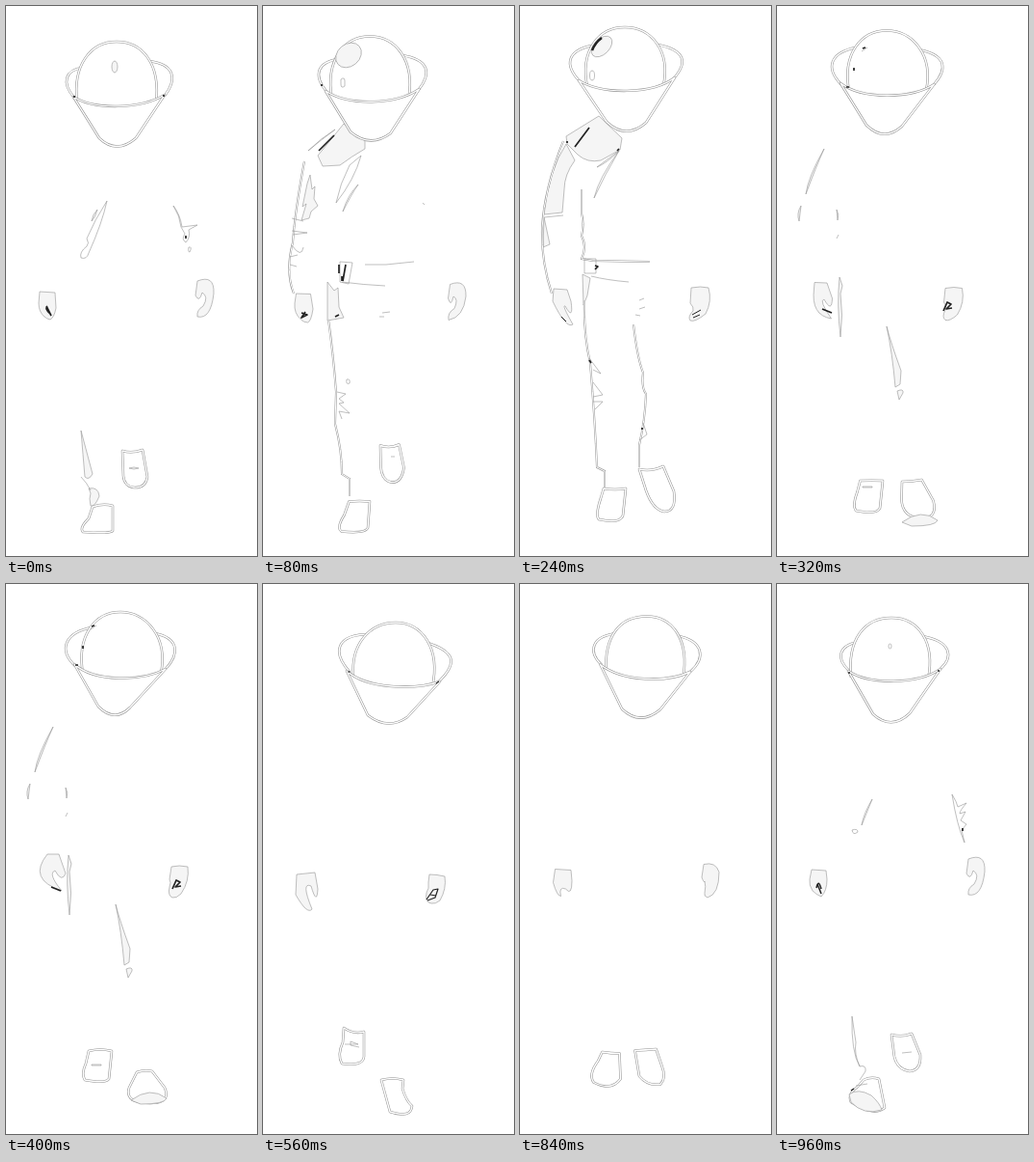
Animation of 261 by 570 pixels, one loop 1 s. Source, as an HTML page without scripts:

```html
<!DOCTYPE html>
<html lang="en">
<head>
<meta charset="utf-8">
<title>Walking suit</title>
<style>
html, body { margin: 0; height: 100%; overflow: hidden; background: #fff }
svg { display: block; width: 100vw; height: 100vh }
path, ellipse { fill: none; stroke: #949494; stroke-width: .6; stroke-linejoin: round }
.out { fill: #fff; stroke: #949494; stroke-width: 2.5 }
.in { stroke: #fff; stroke-width: 1.4 }
.soft { fill: #f5f5f5 }
.ink { stroke: #222; stroke-width: 1.7 }
.seam { stroke: inherit; stroke-width: inherit }
.edge { stroke: #949494; stroke-width: 2 }
.core { stroke: #fff; stroke-width: 1 }

/* every pose holds for 40 ms */
.ears, .dome, .bowl, .handL, .handR, .footL, .footR { animation: 1s steps(4) infinite }
.ears { animation-name: ears }
.dome { animation-name: dome }
.bowl { animation-name: bowl }
.handL { animation-name: handL }
.handR { animation-name: handR }
.footL { animation-name: footL }
.footR { animation-name: footR }

@keyframes ears {
  0%, 100% { d: path("M80 64C62 66 57 79 71 95M148 57C176 60 178 76 165 93") }
  16% { d: path("M76 46C52 51 46 63 61 82M140 45C171 51 172 64 159 80"); animation-timing-function: steps(2) }
  24% { d: path("M75 41C50 46 45 60 62 78M143 40C173 46 174 59 160 75") }
  40% { d: path("M90 45C61 50 54 68 72 85M154 51C181 56 180 73 166 88") }
  56% { d: path("M112 52C75 52 72 71 90 91M168 60C202 70 202 83 182 102") }
  72% { d: path("M121 42C83 43 80 63 95 78M176 53C201 59 203 78 184 94"); animation-timing-function: steps(6) }
  96% { d: path("M84 60C64 64 61 77 75 90M150 54C181 59 184 75 170 88"); animation-timing-function: steps(1) }
}
@keyframes dome {
  0%, 100% { d: path("M74 100C69 61 88 37 115 37S161 60 156 101") }
  16% { d: path("M69 90C61 52 80 26 107 26S155 52 147 90"); animation-timing-function: steps(2) }
  24% { d: path("M70 84C62 46 82 22 109 22S157 46 149 83") }
  40% { d: path("M80 93C73 53 93 29 119 29S169 54 161 93") }
  56% { d: path("M94 96C91 62 111 40 138 40S185 66 176 107") }
  72% { d: path("M102 85C102 50 117 32 144 32S188 56 182 97"); animation-timing-function: steps(6) }
  96% { d: path("M77 97C73 57 91 35 119 35S165 60 157 99"); animation-timing-function: steps(1) }
}
@keyframes bowl {
  0%, 100% { d: path("M70 94C92 108 140 107 165 92L135 137Q115 154 97 137Z") }
  16% { d: path("M60 82C85 99 135 99 160 80L130 127Q108 141 85 124Z"); animation-timing-function: steps(2) }
  24% { d: path("M61 77C85 92 138 92 161 74L131 121Q110 139 90 120Z") }
  40% { d: path("M71 83C92 102 142 101 166 88L129 128Q113 144 96 127Z") }
  56% { d: path("M87 90C108 109 158 110 184 101L150 138Q130 152 109 136Z") }
  72% { d: path("M93 77C118 98 158 101 184 94L154 126Q131 143 112 124Z"); animation-timing-function: steps(6) }
  96% { d: path("M74 90C96 105 147 104 170 88L138 134Q119 152 100 135Z"); animation-timing-function: steps(1) }
}
@keyframes handL {
  0%, 100% { d: path("M35 296L51 297L52 313Q50 323 46 325Q42 324 40 322Q34 317 34 308Z") }
  16% { d: path("M34 300L48 300L52 315Q50 331 47 331Q43 332 39 328Q30 320 32 308Z"); animation-timing-function: steps(2) }
  24% { d: path("M35 293L49 294L53 306Q56 327 47 311Q43 309 55 330Q48 335 34 306Z") }
  40% { d: path("M43 280L55 280L62 300Q58 310 51 297Q43 300 58 318Q22 306 43 280Z") }
  56% { d: path("M35 301L54 299L57 316Q56 334 50 313Q39 308 51 337Q46 343 34 322Z") }
  72% { d: path("M37 295L55 296L56 309Q56 330 49 308Q39 304 48 329Q44 335 35 313Z"); animation-timing-function: steps(6) }
  96% { d: path("M36 296L51 297L52 306Q52 318 46 324Q41 322 37 318Q33 312 34 306Z"); animation-timing-function: steps(1) }
}
@keyframes handR {
  0%, 96%, 100% { d: path("M199 285Q217 278 216 298Q213 325 199 322Q198 315 205 311Q211 301 204 297Q201 308 197 300Z") }
  16% { d: path("M190 292Q206 286 206 304Q204 320 187 329Q185 321 193 316Q196 306 192 305Q190 318 188 306Z"); animation-timing-function: steps(2) }
  24% { d: path("M178 292Q188 290 196 292Q200 306 193 319Q182 328 177 326Q174 322 180 316Q181 312 177 308Z") }
  40% { d: path("M172 293Q180 291 189 293Q191 308 182 321Q177 326 173 325Q168 323 170 314Q172 309 170 306Z") }
  56% { d: path("M173 301Q181 301 189 303Q191 316 184 328Q179 332 175 331Q168 330 170 320Q173 316 172 309Z") }
  72% { d: path("M183 296Q190 297 198 299Q201 318 191 328Q184 332 179 330Q176 325 180 319Q182 313 181 308Z"); animation-timing-function: steps(6) }
}
@keyframes footL {
  0%, 100% { d: path("M90 519Q101 515 111 518L111 544Q108 547 80 545Q76 541 86 531Z") }
  16% { d: path("M89 508Q100 510 111 509L107 538Q104 547 83 544Q76 541 83 524Z"); animation-timing-function: steps(2) }
  24% { d: path("M87 500Q99 502 110 500L107 528Q104 537 82 532Q78 528 84 510Z") }
  40% { d: path("M86 484Q98 481 110 484L107 513Q103 518 82 514Q78 508 83 497Z") }
  56% { d: path("M84 460Q94 467 105 464L105 490Q104 500 82 497Q77 488 83 475Z") }
  72% { d: path("M81 456Q91 463 101 460L97 483Q90 500 76 496Q69 488 78 468Z"); animation-timing-function: steps(6) }
  96% { d: path("M90 514Q98 510 106 513L112 543Q100 552 77 537Q73 528 84 521Z"); animation-timing-function: steps(1) }
}
@keyframes footR {
  0%, 100% { d: path("M121 461Q131 464 142 460L147 488Q145 500 133 499Q123 498 122 487Z") }
  16% { d: path("M123 450Q133 454 141 449L146 469Q143 490 133 488Q124 485 123 468Z"); animation-timing-function: steps(2) }
  24% { d: path("M124 480Q136 483 149 477L160 503Q163 524 150 524Q138 522 131 502Z") }
  40% { d: path("M136 506Q144 503 152 505L165 522Q172 538 150 538Q123 538 128 522Z") }
  56% { d: path("M123 514Q135 511 146 514L145 523Q149 536 155 541Q154 554 132 547Z") }
  72% { d: path("M120 500Q131 496 143 498L146 511Q155 520 154 532Q140 538 126 530Z"); animation-timing-function: steps(6) }
  96% { d: path("M119 467Q130 470 140 466L149 488Q150 504 138 505Q125 503 122 490Z"); animation-timing-function: steps(1) }
}

/* creases flash by in turn */
g { opacity: 0; animation: 1s step-end infinite }
.a { animation-name: a }
.b { animation-name: b }
.c { animation-name: c }
.d { animation-name: d }
.e { animation-name: e }
.f { animation-name: f }
.g { animation-name: g }
@keyframes a { 0% { opacity: 1 } 8%, 100% { opacity: 0 } }
@keyframes b { 8% { opacity: 1 } 20%, 100% { opacity: 0 } }
@keyframes c { 20% { opacity: 1 } 32%, 100% { opacity: 0 } }
@keyframes d { 32% { opacity: 1 } 48%, 100% { opacity: 0 } }
@keyframes e { 48% { opacity: 1 } 64%, 100% { opacity: 0 } }
@keyframes f { 64% { opacity: 1 } 84%, 100% { opacity: 0 } }
@keyframes g { 88%, 100% { opacity: 1 } }
</style>
</head>
<body>
<svg viewBox="0 0 261 570">
  <defs>
    <path id="stride" class="seam" d="M43 161Q33 215 31 245Q23 275 32 298M68 325Q73 360 76 400L75 433Q82 460 82 485L90 490V508"/>
    <path id="stand" class="seam" d="M45 140Q25 190 23 230Q22 265 33 298M64 190V215Q67 226 64 238Q70 250 64 262L76 264L135 265M67 305Q66 340 73 370Q78 430 80 478L88 482V500M118 330Q122 365 128 380Q126 395 131 402Q130 430 124 455V478"/>
  </defs>

  <!-- suit -->
  <g class="a">
    <path class="soft" d="M89 223Q90 216 95 211Q93 219 89 223ZM78 440L90 485Q86 492 82 488Q80 465 78 440ZM86 500Q96 498 97 508Q92 520 88 518Q86 510 88 505Z"/>
    <path d="M105 202Q100 225 86 256Q84 263 78 261Q76 255 84 249Q87 246 84 241Q92 222 105 202ZM78 488Q84 494 88 502"/>
    <path d="M174 207Q181 216 183 229L199 227L190 232Q192 240 187 245Q182 242 186 236L182 229Q181 218 174 207M190 250q4-1 1 5q-2 0-1-5"/>
    <path class="ink" d="M187 238v3"/>
  </g>
  <g class="b">
    <path class="soft" d="M84 122L106 135V148Q92 156 80 165L62 166L57 155ZM46 184L49 175L51 190L54 187L53 200L57 207L50 213L48 220L40 222L45 205L41 208ZM67 286L74 295L78 292L79 312L84 323L67 326Z"/>
    <use href="#stride" class="edge"/><use href="#stride" class="core"/>
    <path d="M47 150Q60 137 75 128Q60 139 47 150M102 155Q95 180 76 204Q80 184 90 165ZM99 185Q92 195 83 213Q88 196 99 185"/>
    <path d="M30 220l12 3M30 233l16 2-15 2M30 248Q40 262 42 250M28 260l8-2M28 268l7 2M80 265l13 1-4 22-9-2ZM106 268H128L157 265M82 286Q105 289 127 290"/>
    <path d="M77 400l9 2-7 5 5 4-5 1 11 10-11-2 3 8M124 318l8-1M121 322h5M87 387q4-1 3 4q-4 2-3-4M166 204l2 2"/>
    <path class="ink" d="M74 134L58 150M79 268v9M82 280v5M86 268l-3 17M75 322l4-2"/>
  </g>
  <g class="c">
    <path class="soft" d="M82 114L106 137L104 149L84 160Q70 163 60 154L49 143L48 135ZM48 143L57 160Q46 175 46 190L44 214L25 216Q30 170 48 143ZM25 219L31 247L24 250ZM65 278L73 282L70 300L66 310Z"/>
    <use href="#stand" class="edge"/><use href="#stand" class="core"/>
    <path d="M103 150L80 167Q90 163 103 150Q88 175 77 199Q82 178 103 150M67 262h12v15h-12ZM74 280Q90 284 113 286M72 365l12 16-8-4M76 390l10 13-10 2M76 410h10l-8 8M128 432l4 12-8 6M124 305l5-2M124 314l6-2M120 320l5 1M25 219l20-2"/>
    <path class="ink" d="M72 126L57 146M78 269l3 1-3 3M72 367l2 3M101 150l2-2M49 140v2M127 437v2"/>
  </g>
  <g class="d">
    <path class="soft" d="M49 148Q40 168 30 195Q32 178 49 148ZM25 207Q20 215 23 223ZM62 211q3 5 1 11ZM64 237l-2 4M65 281L68 290L66 298Q69 320 66 343Q62 310 65 281ZM114 332Q118 348 129 378L128 392L123 395Q120 360 114 332ZM125 399q7-3 6 2l-4 7Z"/>
  </g>
  <g class="g">
    <path d="M99 223L88 250Q90 238 99 223M78 255q6-2 6 2q-5 4-6-2M78 448L82 475Q80 487 86 500Q77 485 78 448M86 500q7-2 6 5l-6 9"/>
    <path d="M182 218Q187 226 188 231L197 227Q190 235 190 238L196 236L191 245L197 249L192 255L195 268Q187 250 182 218"/>
    <path class="ink" d="M193 253v3"/>
  </g>

  <!-- boots and gloves -->
  <path class="out footL"/><path class="in footL"/>
  <path class="out footR"/><path class="in footR"/>
  <path class="soft handL"/>
  <path class="soft handR"/>

  <!-- helmet -->
  <path class="out ears"/><path class="in ears"/>
  <path class="out dome"/><path class="in dome"/>
  <path class="out bowl"/><path class="in bowl"/>

  <!-- marks -->
  <g class="a">
    <ellipse cx="113" cy="63" rx="3" ry="6" class="soft"/>
    <path d="M128 479q5-2 10 0q-5 2-10 0"/>
    <path class="ink" d="M42 311l5 10M43 311q-3 3 3 8M71 93v2M164 92v2"/>
  </g>
  <g class="b">
    <ellipse cx="89" cy="51" rx="14.500" ry="11.500" class="soft" transform="rotate(-40 89 51)"/>
    <path d="M81 76q4-3 4 2v5q-4 3-4-2ZM133 467h4"/>
    <path class="ink" d="M40 318l6 2-6 3 4-6M61 81v2"/>
  </g>
  <g class="c">
    <ellipse cx="85" cy="42" rx="13" ry="8" class="soft" transform="rotate(-45 85 42)"/>
    <ellipse cx="75" cy="72" rx="2.500" ry="5"/>
    <path class="ink" d="M75 46Q78 38 85 33" style="stroke-width:2.500"/>
    <path class="ink" d="M43 322l5 5M179 320l9-5M180 323l7-3" style="stroke-width:1"/>
  </g>
  <g class="d">
    <path class="soft" d="M130 535Q150 520 167 533Q165 539 140 539Z"/>
    <path d="M89 498h10v1h-10ZM88 47l6-4"/>
    <path class="ink" d="M47 314l10 4M173 316l4-9 4 2-5 5 6-1M80 64v3M89 44l3-1M72 84h3"/>
  </g>
  <g class="e">
    <path d="M85 477h14l-8-3v4l9 2"/>
    <path class="ink" d="M170 327l7-10 5-1-3 9-8 3M174 322l6 1M88 91h3M180 103l3-2" style="stroke-width:1.200"/>
  </g>
  <g class="f">
    <path d="M137 519h3M47 318l-2-6 3 14"/>
    <path class="ink" d="M179 326l7-6M184 321l2-8 3 1-3 5 3 1M94 77l2 2M183 92v3"/>
  </g>
  <g class="g">
    <ellipse cx="117.500" cy="64.500" rx="1.500" ry="2.500"/>
    <path class="soft" d="M75 529Q84 522 98 530Q107 538 109 545Q90 551 77 537Z"/>
    <path d="M82 520l12-2M130 486l10-1"/>
    <path class="ink" d="M42 311l4 10M41 315q2-10 5 1M77 525l3-2M75 91v2M168 89v2" style="stroke-width:1.500"/>
  </g>
</svg>
</body>
</html>
```
